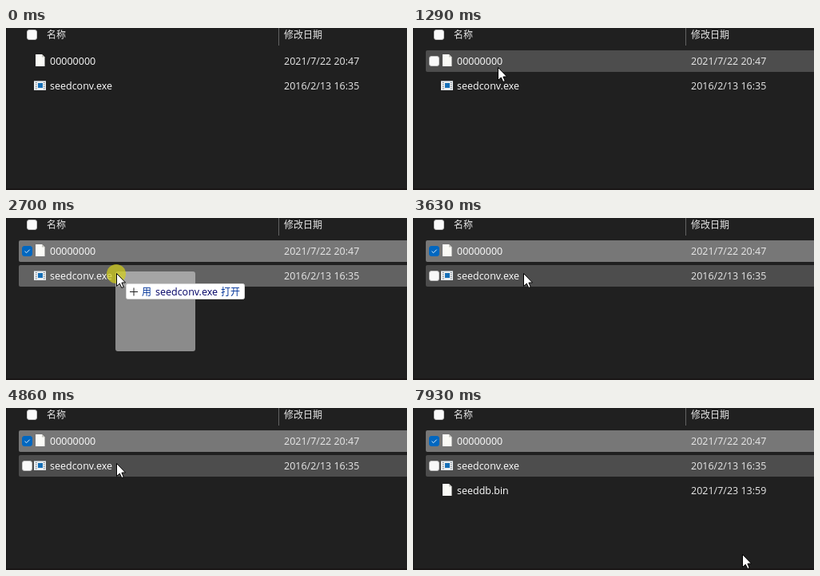
These frames come from a looping animation (502x203 px, 8000 ms). An HTML page with a canvas:

```html
<!DOCTYPE html>
<html lang="zh-CN">
<head>
<meta charset="utf-8">
<style>
  html, body { margin: 0; width: 100%; height: 100%; overflow: hidden; background: #202020; }
  canvas { display: block; }
</style>
</head>
<body>
<canvas id="stage" width="502" height="203"></canvas>
<script>
const ctx = document.getElementById('stage').getContext('2d');
const LOOP = 8000, STEP = 70;
const LATIN = '12.5px "Open Sans", "Noto Sans", sans-serif';
const CJK = '12px "Noto Sans CJK SC", "Noto Sans CJK", sans-serif';
const SOFT_WHITE = '#e8e8e8';

// Pointer path: time, x, y
const path = [
  [340, 112, 183], [610, 84, 43], [1010, 98, 24], [1080, 98, 24],
  [1430, 112, 66], [1770, 125, 36], [2120, 125, 36], [2190, 129, 43],
  [2700, 138, 69], [7790, 138, 69], [7930, 412, 183]
];

const within = (t, from, to) => t >= from && t < to;

function pointerAt(t) {
  let i = path.length - 1;
  while (i > 0 && path[i][0] > t) i--;
  const [t0, x0, y0] = path[i];
  const [t1, x1, y1] = path[i + 1] || [t0 + 1, x0, y0];
  const held = Math.floor(Math.max(0, t - t0) / STEP) * STEP;
  const k = Math.min(1, held / (t1 - t0));
  return { x: Math.round(x0 + (x1 - x0) * k), y: Math.round(y0 + (y1 - y0) * k) };
}

function rect(x, y, w, h, color) {
  ctx.fillStyle = color;
  ctx.fillRect(x, y, w, h);
}

function paint(fill, stroke) {
  ctx.fillStyle = fill;
  ctx.fill();
  if (!stroke) return;
  ctx.lineWidth = 1;
  ctx.lineJoin = 'round';
  ctx.strokeStyle = stroke;
  ctx.stroke();
}

function roundRect(x, y, w, h, r, fill, stroke) {
  ctx.beginPath();
  ctx.roundRect(x, y, w, h, r);
  paint(fill, stroke);
}

function polygon(points, fill, stroke) {
  ctx.beginPath();
  points.forEach(([x, y]) => ctx.lineTo(x, y));
  ctx.closePath();
  paint(fill, stroke);
}

function text(str, x, y, font, color) {
  ctx.font = font;
  ctx.fillStyle = color;
  ctx.fillText(str, x, y);
}

function checkbox(x, y, checked) {
  if (!checked) return roundRect(x + .5, y + .5, 12, 12, 2.5, '#f9f9f9', '#c4c4c4');
  roundRect(x + .5, y + .5, 12, 12, 2.5, '#0067c0', '#0067c0');
  ctx.beginPath();
  ctx.moveTo(x + 3.5, y + 6.7);
  ctx.lineTo(x + 5.6, y + 8.7);
  ctx.lineTo(x + 9.7, y + 4.6);
  ctx.strokeStyle = '#e4f0fa';
  ctx.stroke();
}

function pageIcon(y) {
  polygon([[37, y], [45, y], [48.5, y + 3.5], [48.5, y + 15], [37, y + 15]], '#fafaf6');
  polygon([[45, y], [48.5, y + 3.5], [45, y + 3.5]], '#c6c6c0');
}

function exeIcon(y) {
  rect(35, y, 15, 12, '#e9edf0');
  rect(35, y, 15, 1, '#a9afb4');
  rect(40, y + 3, 6, 6, '#1670b8');
  for (let i = 0; i < 4; i++) {
    rect(37, y + 2 + i * 2.5, 1.5, 1, '#68757e');
    rect(47, y + 2 + i * 2.5, 1.5, 1, '#68757e');
  }
}

function row(top, { name, date, icon, fill, box, checked }) {
  if (fill) roundRect(16, top, 500, 27, 2, fill);
  if (box) checkbox(20, top + 7, checked);
  icon(top + (icon === exeIcon ? 7 : 5));
  text(name, 55, top + 18, LATIN, '#ffffff');
  text(date, 348, top + 18, LATIN, SOFT_WHITE);
}

function header() {
  checkbox(26, 2);
  text('名称', 51, 13, CJK, SOFT_WHITE);
  text('修改日期', 348, 13, CJK, SOFT_WHITE);
  rect(341, 0, 1, 22, '#636363');
}

function dropLabel(x, y) {
  roundRect(x + .5, y + .5, 148, 19, 2, '#ffffff', '#d5d5d5');
  rect(x + 5, y + 10, 10, 1, '#202020');
  rect(x + 9.5, y + 5.5, 1, 10, '#202020');
  text('用', x + 20, y + 14.5, CJK, '#003399');
  text('seedconv.exe', x + 37, y + 14.5, LATIN, '#000066');
  text('打开', x + 119, y + 14.5, CJK, '#003399');
}

function clickHalo({ x, y }) {
  ctx.beginPath();
  ctx.arc(x, y + 1, 12, 0, Math.PI * 2);
  paint('rgba(212,208,24,.7)');
}

function arrow({ x, y }) {
  const shape = [[0, 0], [0, 16], [3.8, 12.6], [6.3, 18], [8.8, 17], [6.4, 11.6], [11, 11.4]];
  polygon(shape.map(([dx, dy]) => [x + .5 + dx, y + .5 + dy]), '#ffffff', '#000000');
}

function draw(t) {
  const p = pointerAt(t);
  const visible = within(t, 340, 5230) || within(t, 6250, 6390) || t >= 7790;
  const pressed = within(t, 2050, 3560) || within(t, 6250, 6390);
  const dragging = within(t, 2330, 3560);
  const selected = t >= 2190;
  const overFirst = visible && within(p.y, 28, 55);
  const overSecond = t >= 2700 || (visible && within(p.y, 59, 86));
  const dropping = dragging && overSecond;
  const secondBox = t >= 3630 || (overSecond && t < 2190);

  rect(0, 0, 502, 203, '#202020');
  rect(0, 0, 1, 203, '#191919');
  rect(0, 201, 502, 2, '#1a1616');
  header();

  row(28, {
    name: '00000000', date: '2021/7/22 20:47', icon: pageIcon,
    fill: selected ? '#777777' : overFirst && '#4d4d4d',
    box: selected || overFirst, checked: selected
  });
  row(59, {
    name: 'seedconv.exe', date: '2016/2/13 16:35', icon: exeIcon,
    fill: overSecond && (dropping ? '#626262' : '#4d4d4d'),
    box: secondBox
  });
  if (t >= 6020) row(90, { name: 'seeddb.bin', date: '2021/7/23 13:59', icon: pageIcon });

  const dim = within(t, 4710, 4770) ? .4 : within(t, 4770, 4860) ? .2 : 0;
  if (dim) rect(0, 0, 502, 203, `rgba(12,12,12,${dim})`);

  if (dragging) roundRect(p.x - 1, p.y - 2, 100, 100, 3, 'rgba(210,210,210,.6)');
  if (pressed) clickHalo(p);
  if (dropping) dropLabel(p.x + 12, p.y + 13);
  if (visible) arrow(p);
}

const start = performance.now();
function tick() {
  draw((performance.now() - start) % LOOP);
  requestAnimationFrame(tick);
}
tick();
</script>
</body>
</html>
```
